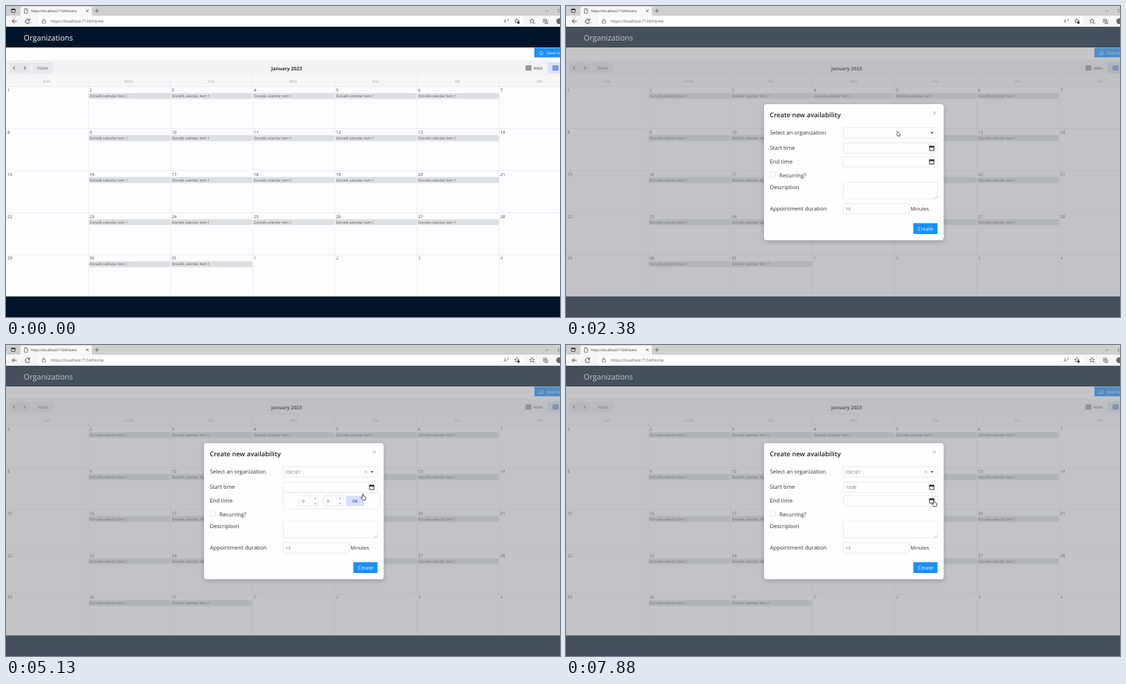
Animation of 800 by 450 pixels, one loop 8000 ms. Source, as an HTML page:

```html
<!DOCTYPE html>
<html lang="en">
<head>
<meta charset="utf-8">
<title>Calendar availability</title>
<style>
html, body { margin: 0; width: 100%; height: 100%; overflow: hidden; background: #001529; }
svg { display: block; width: 800px; height: 450px; }
text { font-family: "Open Sans", "Noto Sans", sans-serif; text-rendering: geometricPrecision; white-space: pre; }
</style>
</head>
<body>
<svg id="stage" viewBox="0 0 800 450" xmlns="http://www.w3.org/2000/svg">
  <defs>
    <filter id="shadow" x="-10%" y="-10%" width="120%" height="125%">
      <feDropShadow dx="0" dy="2" stdDeviation="3.5" flood-opacity=".22"/>
    </filter>
  </defs>
  <g id="page"></g>
  <rect id="veil" y="30" width="800" height="420" fill="#898b8f" fill-opacity=".5"/>
  <g id="dialog"></g>
  <g id="arrow"><path d="M0 0V7.4L1.8 5.8L3 8.4L4.2 7.9L3.1 5.4H5.4Z" fill="#fff" stroke="#333" stroke-width=".65" stroke-linejoin="round"/></g>
  <g id="hand"><path d="M-.8 .4Q0 -.6 .8 .4V3.2L3.6 3.9Q4.5 4.3 4.3 5.5L3.6 9H-.4L-2.9 5.5Q-2.5 4.4 -.8 5.6Z" fill="#fff" stroke="#222" stroke-width=".75" stroke-linejoin="round"/></g>
</svg>
<script>
const LOOP = 8000, STEP = 125;
const BLUE = '#1890ff', NAVY = '#001529', PAPER = '#fefdff';
const byId = id => document.getElementById(id);

const rect = (x, y, w, h, fill, extra = '') =>
  `<rect x="${x}" y="${y}" width="${w}" height="${h}" fill="${fill}" ${extra}/>`;
const text = (x, y, size, str, fill = '#333', extra = '') =>
  `<text x="${x}" y="${y}" font-size="${size}" fill="${fill}" ${extra}>${str}</text>`;
const line = (d, stroke = '#444', width = .8, extra = '') =>
  `<path d="${d}" fill="none" stroke="${stroke}" stroke-width="${width}" ${extra}/>`;
const group = (id, body) => `<g id="${id}">${body}</g>`;
const field = (y, h, w = 136) => rect(400.5, y, w, h, PAPER, 'rx="1.5" stroke="#dfdfe5" stroke-width=".7"');
const middle = 'text-anchor="middle"';

function star(cx, cy, r) {
  const points = Array.from({ length: 10 }, (_, i) => {
    const a = i * Math.PI / 5 - Math.PI / 2, q = i % 2 ? r * .45 : r;
    return `${(cx + q * Math.cos(a)).toFixed(2)} ${(cy + q * Math.sin(a)).toFixed(2)}`;
  });
  return line(`M${points.join('L')}Z`, '#444', .7);
}

function tableIcon(x, y, color) {
  return rect(x, y, 7, 6, 'none', `stroke="${color}" stroke-width=".9"`) +
    line(`M${x} ${y + 2}h7M${x} ${y + 4}h7M${x + 2.3} ${y}v6M${x + 4.7} ${y}v6`, color, .7);
}

function dateIcon(y) {
  return rect(525, y + .8, 6.3, 6, 'none', 'stroke="#222" stroke-width=".9"') +
    rect(524.6, y + .4, 7.1, 2, '#222') + line(`M526.4 ${y - .5}v1.5M529.9 ${y - .5}v1.5`, '#222', .9);
}

function browser() {
  const url = 'https://localhost:7134/Home';
  return rect(0, 0, 800, 30, '#f7f7f7') + rect(0, 0, 800, 14, '#cecfcf') +
    `<path d="M19 14Q21 14 21 12V3Q21 1 23 1H122Q124 1 124 3V12Q124 14 126 14Z" fill="#f7f7f7"/>` +
    rect(7.8, 4.3, 5.4, 5.2, 'none', 'rx=".8" stroke="#222" stroke-width=".8"') + rect(7.8, 4.3, 5.4, 1.6, '#222') +
    line('M26.5 3.8h3l1.7 1.7v5h-4.7zM29.3 3.8v2h2', '#555', .7) +
    text(36, 9, 4.95, url) +
    line('M115.4 5l4 4m0-4l-4 4', '#333', .7) + line('M128.3 7h6M131.3 4v6', '#444', .7) +
    line('M779 7.2h4.5M797.5 5h4v4h-4z', '#666', .6) +
    rect(47, 15.8, 700, 12.6, '#fff', 'rx="2"') +
    line('M15.5 22H8.8M12 18.8L8.8 22l3.2 3.2', '#333', .9) +
    line('M33.7 20.3A3.3 3.3 0 1 0 34.4 22.6M34.2 18.3v2.4h-2.4', '#333', .9) +
    rect(52.3, 21.2, 4.6, 3.6, 'none', 'rx=".6" stroke="#555" stroke-width=".7"') +
    line('M53.3 21v-1a1.3 1.3 0 0 1 2.6 0v1', '#555', .7) +
    text(64.3, 24.2, 5.76, url, '#555') +
    text(718.8, 24.3, 6.5, 'A', '#444') + line('M723.8 18.8q1 1.2 0 2.5M725.2 18.2q1.5 1.8 0 3.6', '#555', .5) +
    star(737.5, 21.8, 3.6) + `<circle cx="740" cy="24" r="1.9" fill="#444"/>` +
    star(759.5, 21.8, 3.6) + line('M761.5 24.6h2.5', '#444', .7) +
    line('M776 19h4.5v4.8H776zM778 25.5h4.2v-4.7M777 21.4h2.6M778.3 20.1v2.6', '#444', .7) +
    `<circle cx="798.8" cy="22" r="4.2" fill="#666a70"/>`;
}

function calendar() {
  const colW = 118.63, rowH = 60.8, top = 116.8;
  let out = rect(0, 78, 800, 342.5, '#fdfcff') + rect(0, 78, 800, 23, '#f3f3f6') +
    rect(0, 101, 800, 15.8, '#f7f7f9') +
    rect(5, 82, 31, 15.5, '#e6e7ea', 'rx="1.5"') + rect(38, 82, 30, 15.5, '#e6e7ea', 'rx="1.5"') +
    line('M12.7 87.5l-2 2.2 2 2.2M26.3 87.5l2 2.2-2 2.2', '#333', 1) +
    text(53, 91.6, 4.9, 'TODAY', '#444', middle) +
    text(405.2, 92.6, 6.9, 'January 2023', '#333', middle + ' font-weight="700"') +
    tableIcon(751, 86.7, '#555') + text(762, 91.6, 4.9, 'WEEK', '#333') +
    rect(782, 82, 20, 15.5, '#d9e1f8') + tableIcon(790, 86.7, '#3d5fd0');
  ['SUN', 'MON', 'TUE', 'WED', 'THU', 'FRI', 'SAT'].forEach((day, c) => {
    out += text((c + .5) * colW, 110.6, 4.95, day + '.', '#999', middle);
    if (c) out += line(`M${c * colW + .3} 101V420.5`, '#e9e9ee', .8);
  });
  for (let r = 0; r < 5; r++) {
    const y = top + r * rowH;
    out += line(`M0 ${y}H800`, '#e6e6eb', .8);
    for (let c = 0; c < 7; c++) {
      const n = r * 7 + c, x = c * colW;
      out += text(x + 1.9, y + 7.3, 6.2, n % 31 + 1, n < 31 ? '#444' : '#666');
      if (c % 6 && n < 31)
        out += rect(x + 1, y + 9.2, colW - 1.2, 8.6, '#dcdfe1', 'rx="1.4"') +
          text(x + 2.2, y + 15.4, 4.95, 'Dorvelk calendar item 1', '#555');
    }
  }
  return out;
}

function page() {
  return rect(0, 0, 800, 450, '#fff') + browser() + rect(0, 30, 800, 30, NAVY) +
    text(25.6, 49.6, 11, 'Organizations', '#fff') +
    rect(763, 60.5, 40, 13.8, BLUE) +
    line('M771.3 70h3.4a1.3 1.3 0 0 0 .2-2.5a2 2 0 0 0-3.8-.2a1.4 1.4 0 0 0 .2 2.7M773 71.2v-2.5', '#fff', .6) +
    text(781, 69.8, 6, 'Save to', '#fff') +
    calendar() + rect(0, 420.3, 800, 30, NAVY);
}

function spinner(id, x, value) {
  return rect(x, 218, 28, 15, PAPER, 'rx="1.2" stroke="#dcdce2" stroke-width=".7"') +
    group(id, rect(x + 4.2, 221, 4.2, 9, '#2479db')) +
    text(x + 4.4, 227.8, 5.9, value, '#555', `id="${id}Value"`) +
    line(`M${x + 22} 222.8l1.6-1.5 1.6 1.5M${x + 22} 228.6l1.6 1.5 1.6-1.5`, '#555', .7);
}

function dialog() {
  const labels = [[294.4, 186, 'Select an organization'], [294.4, 208.2, 'Start time'], [294.4, 227.7, 'End time'],
    [308, 247.6, 'Recurring?'], [294.4, 265, 'Description'], [294.4, 296, 'Appointment duration']];
  return rect(286, 142, 259.3, 197, PAPER, 'rx="4" filter="url(#shadow)"') +
    text(294.3, 161.2, 9.4, 'Create new availability', '#222', 'font-weight="600"') +
    line('M529.8 152.7l4.6 4.6m0-4.6l-4.6 4.6', '#999', .7) +
    labels.map(([x, y, str]) => text(x, y, 7.9, str)).join('') +
    field(176, 15) + field(198.2, 15) + field(218, 15) + field(255, 24) + field(286, 15, 95) +
    rect(294.6, 240, 8, 8, PAPER, 'rx="1" stroke="#dcdce2" stroke-width=".7"') +
    line('M532.5 278l3-3M534.3 278l1.2-1.2', '#888', .5) +
    '<path d="M526.4 182.4h4.2l-2.1 2.5z" fill="#333"/>' +
    group('chosen', text(404, 185.6, 5.9, 'CSC101', '#555') + line('M517.5 181.4l4.2 4.2m0-4.2l-4.2 4.2', '#888', .6)) +
    group('focus', rect(400.5, 198.2, 136, 15, PAPER, 'rx="1.5" stroke="#dbe4ff" stroke-width="2.2"') +
      rect(400.5, 198.2, 136, 15, PAPER, 'rx="1.5" stroke="#4c76e8" stroke-width=".9"') + group('caret', line('M404.6 201.5v8.5', '#333', .7))) +
    text(404.3, 208, 5.8, '13:00', '#555', 'id="start"') +
    dateIcon(202.3) + dateIcon(222) +
    text(404, 295.7, 6, '15', '#555') + text(497.5, 296, 7.05, 'Minutes') +
    rect(501.5, 314.3, 35, 15.7, BLUE, 'rx="1"') + text(519, 325, 7.2, 'Create', '#fff', middle) +
    group('menu', rect(400.5, 190.5, 136, 49.5, PAPER, 'rx="1" stroke="#dcdce2" stroke-width=".7"') +
      line('M400.5 206.8h136', '#e5e5ea', .6) +
      '<circle cx="408" cy="197.3" r="2" fill="none" stroke="#333" stroke-width=".9"/>' + line('M409.5 198.8l2 2', '#333', 1) +
      group('hover', rect(400.8, 207, 135.4, 16, '#cfdcfb')) +
      text(404, 217.2, 5.9, 'CSC101', '#555', 'id="option"') + text(404, 233.5, 5.9, 'CSC102', '#555')) +
    group('picker', rect(400.5, 213.8, 139.5, 23.4, PAPER, 'rx="1.5" stroke="#e6e6ec" stroke-width=".7"') +
      spinner('hour', 423, '0') + text(455.3, 227.6, 6, ':', '#666', middle) + spinner('minute', 459, '0') +
      rect(491, 218, 26, 15, '#d8e0fa', 'rx="1.2" id="ok"') +
      text(504, 227.6, 5.8, 'Ok', '#3353c8', middle + ' font-weight="600"'));
}

// Pointer path: time, x, y
const path = [
  [250, 815, 59], [630, 690, 68], [880, 440, 100], [1130, 170, 134], [1250, 150.8, 137], [1500, 150.8, 137],
  [1880, 354, 172], [2250, 478, 181], [2630, 478, 181], [3000, 426.6, 210], [3300, 426.6, 210],
  [3630, 470, 203], [4000, 528.6, 207], [4900, 528.6, 207], [5250, 508, 220], [5750, 420.8, 225],
  [6250, 420.8, 225], [6625, 504, 227], [7000, 504, 227], [7500, 531.3, 224.5], [8000, 531.3, 224.5]
];

function pointerAt(t) {
  if (t <= path[0][0]) return path[0].slice(1);
  const i = path.findIndex(p => p[0] > t);
  const [t0, x0, y0] = path[i - 1], [t1, x1, y1] = path[i];
  const u = (t - t0) / (t1 - t0);
  return [x0 + (x1 - x0) * u, y0 + (y1 - y0) * u];
}

byId('page').innerHTML = page();
byId('dialog').innerHTML = dialog();

const within = (t, from, to = LOOP) => t >= from && t < to;
const show = (id, on) => byId(id).setAttribute('display', on ? 'inline' : 'none');

function render(time) {
  const t = Math.floor((time % LOOP + 5) / STEP) * STEP % LOOP;
  const [x, y] = pointerAt(t);
  const open = t >= 1375;
  show('veil', open);
  show('dialog', open);
  show('menu', within(t, 2500, 3375));
  show('hover', t >= 2875);
  byId('option').setAttribute('fill', t >= 2875 ? '#4661cf' : '#555');
  show('chosen', t >= 3375);
  show('focus', within(t, 4125, 4875));
  show('caret', within(t, 4125, 4750));
  show('picker', within(t, 4875, 7000));
  show('hour', within(t, 5875, 6250));
  show('minute', false);
  byId('hourValue').textContent = t < 6250 ? '0' : t < 6375 ? '1' : '13';
  byId('hourValue').setAttribute('fill', within(t, 5875, 6250) ? '#fff' : '#555');
  byId('ok').setAttribute('fill', within(t, 5250, 5375) || within(t, 6625, 7000) ? '#cbd6f8' : '#d8e0fa');
  show('start', t >= 7000);

  const hand = within(t, 4000, 5375) || t >= 6625;
  show('hand', hand);
  show('arrow', !hand);
  byId(hand ? 'hand' : 'arrow').setAttribute('transform', `translate(${x} ${y})`);
}

const began = performance.now();
function tick() {
  render(performance.now() - began);
  requestAnimationFrame(tick);
}
tick();
</script>
</body>
</html>
```
